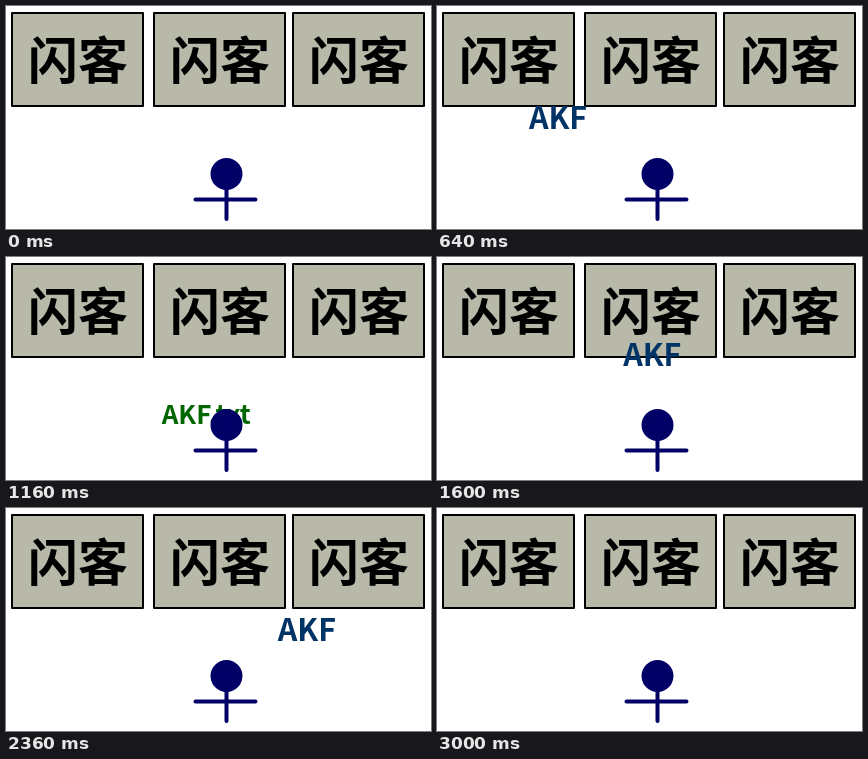
Animation, 425 px wide and 223 px high, one loop 3.32 s. Source, as an HTML page:

```html
<!DOCTYPE html>
<html lang="zh">
<head>
<meta charset="utf-8">
<style>
  html, body { margin: 0; width: 100%; height: 100%; overflow: hidden; background: #fff; }
  svg { display: block; width: 425px; height: 223px; }
  text { font-family: "Noto Sans CJK SC", "Noto Sans CJK", sans-serif; font-weight: 700; }
  .server rect { fill: #b9b9aa; stroke: #000; stroke-width: 2; stroke-linejoin: round; }
  .server text { font-size: 50px; text-anchor: middle; }
  .user { fill: #000066; stroke: #000066; stroke-width: 4; stroke-linecap: round; }
</style>
</head>
<body>
<svg viewBox="0 0 425 223">
  <g id="servers"></g>
  <text id="packet"></text>
  <g class="user">
    <circle cx="220.5" cy="168" r="14"/>
    <path d="M220.5 168V213M189.5 193.5H249.5"/>
  </g>
</svg>
<script>
const LOOP = 3320, START = 360, TICK = 40, STEPS = 11;

document.getElementById('servers').innerHTML = [6, 148, 287].map(x => `
  <g class="server">
    <rect x="${x}" y="7" width="131" height="93"/>
    <text x="${x + 66}" y="73">闪客</text>
  </g>`).join('');

const request = (x, y) => ({ label: 'AKF', size: 30.5, fill: '#003366', from: [192, 172], to: [x, y] });
const reply = (x, y, endY) => ({ label: 'AKF.txt', size: 26, fill: '#006600', from: [x, y], to: [170, endY] });

// Each trip takes 11 ticks and moves at constant speed.
const trips = [
  request(49, 102), reply(26.7, 110.5, 173),
  request(185.5, 102), reply(168, 109, 174),
  request(325, 107), reply(308, 106.5, 172)
];

const packet = document.getElementById('packet');
const lerp = (a, b, p) => a + (b - a) * p;

function draw(ms) {
  const tick = Math.floor((ms % LOOP - START) / TICK);
  const trip = trips[Math.floor(tick / STEPS)];
  packet.style.display = trip ? '' : 'none';
  if (!trip) return;
  const p = tick % STEPS / (STEPS - 1);
  packet.textContent = trip.label;
  packet.setAttribute('font-size', trip.size);
  packet.setAttribute('fill', trip.fill);
  packet.setAttribute('x', lerp(trip.from[0], trip.to[0], p));
  packet.setAttribute('y', lerp(trip.from[1], trip.to[1], p));
}

let origin;
function loop(now) {
  origin ??= now;
  draw(now - origin);
  requestAnimationFrame(loop);
}
draw(0);
requestAnimationFrame(loop);
</script>
</body>
</html>
```
